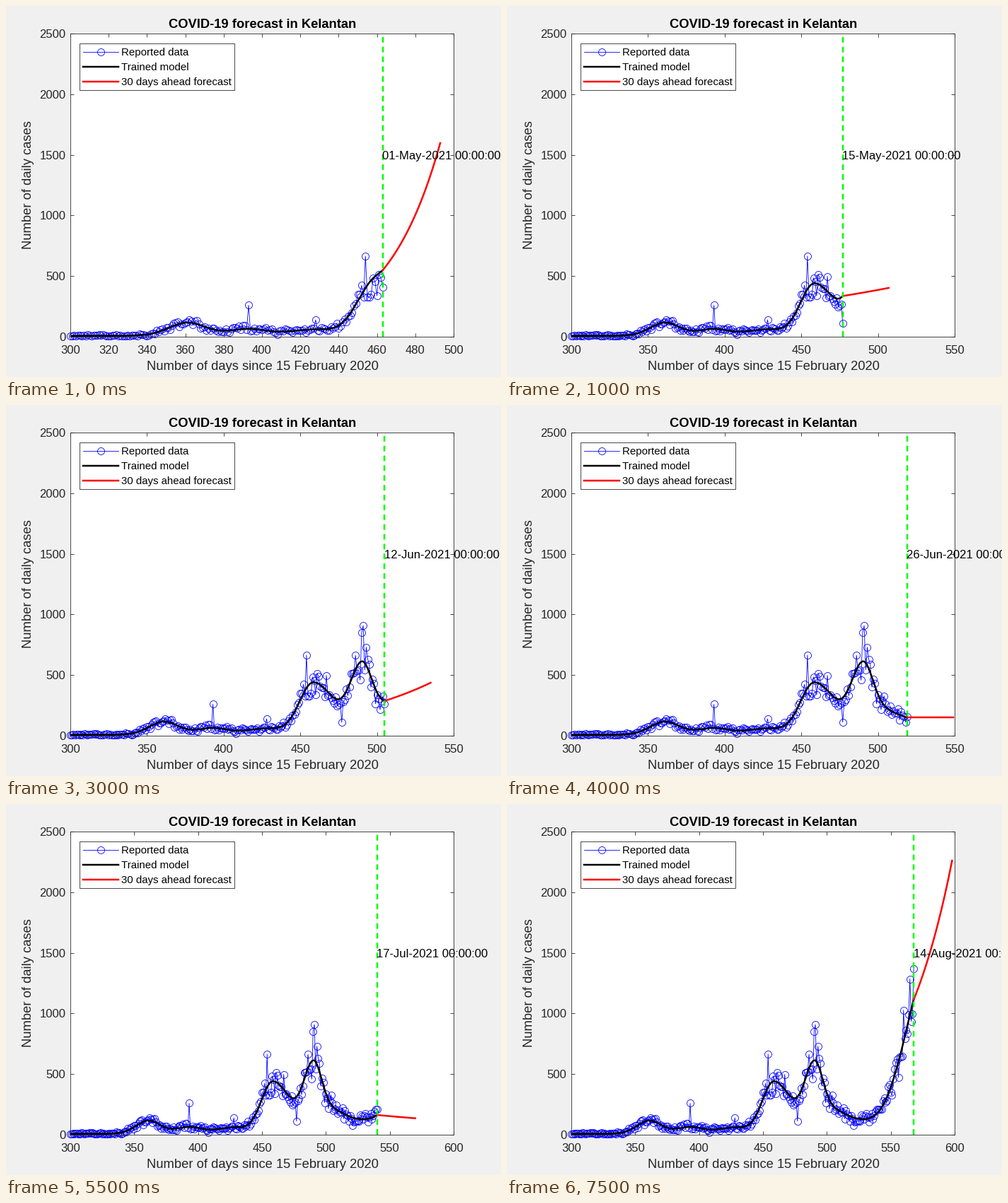
Write a matplotlib script that moves like this. It is 700x525 px and loops after 8000 ms.

```python
import numpy as np
import matplotlib.pyplot as plt
from matplotlib.animation import FuncAnimation
from matplotlib.patches import Rectangle

W, H = 700, 525
PT = 0.72  # points per pixel at 100 dpi
GREY, BLUE, LIME = "#262626", "#0000ff", "#00ff00"
FIRST, START, STEP, FRAMES = 300, 463, 7, 16
TAIL = 12   # days at the end of the model that lean with the outlook
LEAN = 120  # cases added there per unit of log growth

# Waves of infection: peak day, height, rise and fall widths in days
WAVES = [(361, 84, 8.5, 8.5), (393, 30, 8, 8), (427, 25, 9, 9),
         (458.5, 405, 9, 13), (490, 440, 7.5, 6.5), (502, 170, 14, 14),
         (530, 45, 12, 12), (575, 1090, 16.5, 16.5)]

# Single days that stand out from the noise
SPIKES = {393: 258, 428: 138, 454: 664, 477: 110,
          490: 852, 491: 908, 565: 1285, 568: 1372}

# Growth over the 30 days ahead at a few key weeks
WEEKS = (0, 2, 4, 8, 11, 13, 15)
GROWTH = (2.92, 1.2, 2.32, 1.0, 0.83, 1.13, 2.03)

plt.rcParams["font.family"] = "Liberation Sans"


def trend(x):
    """Smoothed daily cases: a low plateau plus the waves."""
    total = 6 + 27 / (1 + np.exp(-(x - 345) / 5))
    for peak, height, rise, fall in WAVES:
        width = np.where(x < peak, rise, fall)
        total = total + height * np.exp(-0.5 * ((x - peak) / width) ** 2)
    return total


def reported(days):
    rng = np.random.default_rng(15)
    base = trend(days)
    cases = np.maximum(base + rng.normal(size=len(days)) * (5 + 0.13 * base), 2)
    for day, value in SPIKES.items():
        cases[day - FIRST] = value
    return cases


def date_label(offset):
    day = offset + 1
    for month, length in (("May", 31), ("Jun", 30), ("Jul", 31), ("Aug", 31)):
        if day <= length:
            return f"{day:02d}-{month}-2021 00:00:00"
        day -= length


DAYS = np.arange(FIRST, START + STEP * (FRAMES - 1) + 1)
CASES = reported(DAYS)

fig = plt.figure(figsize=(W / 100, H / 100), dpi=100, facecolor="#f0f0f0")
ax = fig.add_axes([91 / W, 57.3 / H, 542 / W, 428.3 / H])
ax.set_ylim(0, 2500)
ax.set_yticks(range(0, 2501, 500))
ax.tick_params(direction="in", top=True, right=True, length=5 * PT,
               width=0.83 * PT, color=GREY, labelcolor=GREY,
               labelsize=16.67 * PT)
ax.tick_params(axis="x", pad=12.2 * PT)
ax.tick_params(axis="y", pad=6.5 * PT)
for spine in ax.spines.values():
    spine.set(linewidth=0.83 * PT, edgecolor=GREY)

DATA = dict(color=BLUE, lw=0.83 * PT, marker="o", ms=10 * PT, mfc="none",
            mew=0.83 * PT)
MODEL = dict(color="black", lw=2.5 * PT)
AHEAD = dict(color="red", lw=2.5 * PT)

data, = ax.plot([], [], clip_on=False, **DATA)
model, = ax.plot([], [], **MODEL)
ahead, = ax.plot([], [], **AHEAD)
today, = ax.plot([], [], color=LIME, lw=2.5 * PT, ls=(0, (3.2, 2.35)),
                 dash_capstyle="butt")
stamp = ax.text(0, 1465, "", size=16.67 * PT, zorder=5)

# Overlay in pixel coordinates for titles and legend
over = fig.add_axes([0, 0, 1, 1])
over.set(xlim=(0, W), ylim=(H, 0))
over.axis("off")


def label(x, y, text, px, **kw):
    over.text(x, y, text, size=px * PT, va="baseline", **kw)


label(363, 31, "COVID-19 forecast in Kelantan", 18.33, ha="center",
      weight="bold")
label(363, 515, "Number of days since 15 February 2020", 18.33, ha="center",
      color=GREY)
label(36.5, 253.5, "Number of daily cases", 18.33, ha="center", color=GREY,
      rotation=90, rotation_mode="anchor")

over.add_patch(Rectangle((104, 52.7), 219, 66, fc="white", ec=GREY,
                         lw=0.83 * PT))
rows = (("Reported data", DATA), ("Trained model", MODEL),
        ("30 days ahead forecast", AHEAD))
for i, (name, style) in enumerate(rows):
    y = 65 + 20.8 * i
    over.plot([109, 134, 159], [y] * 3, markevery=[1], **style)
    label(163, y + 5, name, 15, ha="left")


def update(k):
    day = START + STEP * k
    n = day - FIRST + 1
    growth = np.interp(k, WEEKS, np.log(GROWTH))

    right = 50 * -(-(day + 30) // 50)
    ax.set_xlim(FIRST, right)
    ax.set_xticks(range(FIRST, right + 1, 20 if right == 500 else 50))

    data.set_data(DAYS[:n], CASES[:n])
    x = np.linspace(FIRST, day, 2 * n)
    pull = np.clip(1 - (day - x) / TAIL, 0, 1) ** 2
    fit = trend(x) + LEAN * growth * pull
    model.set_data(x, fit)

    t = np.arange(31)
    ahead.set_data(day + t, fit[-1] * np.exp(growth * t / 30))
    today.set_data([day, day], [0, 2500])
    stamp.set_x(day - 0.3)
    stamp.set_text(date_label(STEP * k))
    return data, model, ahead, today, stamp


anim = FuncAnimation(fig, update, frames=FRAMES, interval=500, repeat=True,
                     repeat_delay=0, blit=False)
plt.show()
```
